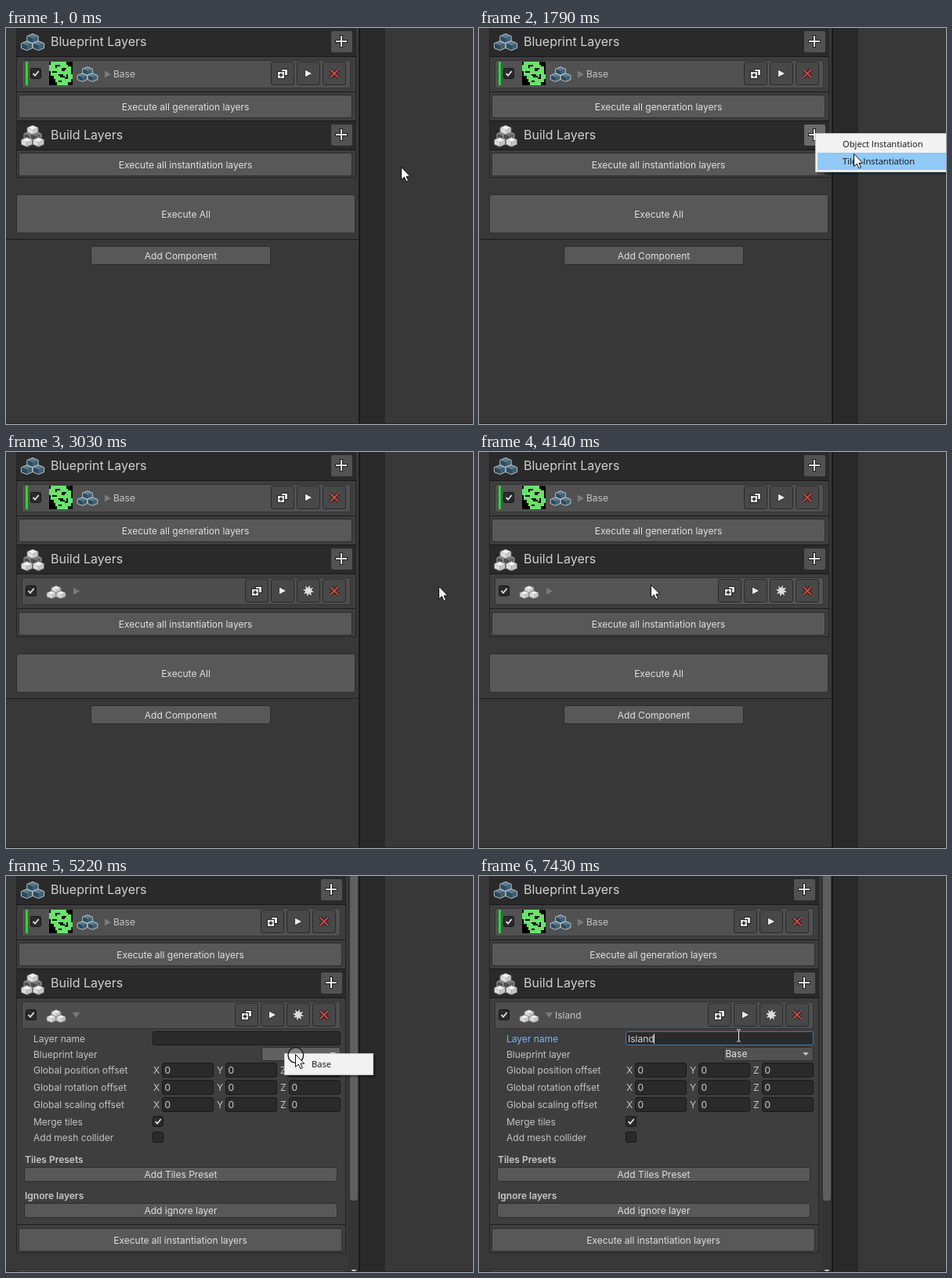
These frames come from a looping animation (596x505 px, 8 s). An HTML page:

```html
<!DOCTYPE html>
<html lang="en">
<head>
<meta charset="utf-8">
<title>Layer inspector</title>
<style>
html, body { margin: 0; width: 100%; height: 100%; overflow: hidden; background: #383838; }
svg { display: block; width: 596px; height: 505px; }
text { font-family: Inter, sans-serif; font-size: 12px; white-space: pre; }
.menu { font-family: "Open Sans", sans-serif; font-size: 11.2px; }
</style>
</head>
<body>
<svg id="stage" viewBox="0 0 596 505" xmlns="http://www.w3.org/2000/svg"></svg>
<script>
const LOOP = 8000;
const stage = document.getElementById('stage');

// Pointer track: time, x, y; each position holds until the next.
const track = [
  [0, 504, 177], [150, 518, 171], [300, 496, 160], [450, 462, 147], [580, 438, 138], [730, 430, 135],
  [1530, 438, 141], [1660, 458, 150], [1790, 478, 160], [1930, 496, 168], [2060, 511, 170],
  [2180, 531, 171], [2330, 552, 171],
  [3710, 515, 172], [3860, 415, 175], [4000, 300, 173], [4140, 219, 169], [4290, 196, 173],
  [4560, 208, 181], [4690, 250, 197], [4820, 305, 215], [4960, 350, 225], [5090, 369, 227],
  [5370, 376, 234], [5500, 388, 243], [5910, 362, 224], [6050, 331, 203]
];
const clicks = [[1130, 1250], [2760, 2900], [4290, 4560], [5220, 5370], [5770, 5910], [6180, 6320]];
const typing = [[7010, 'Is'], [7150, 'Isl'], [7290, 'Islan'], [7430, 'Island']];

const last = (list, t) => list.filter(k => k[0] <= t).pop();
const within = (t, a, b) => t >= a && t < b;

function rect(x, y, w, h, fill, line, r = 0) {
  return line
    ? `<rect x="${x + .5}" y="${y + .5}" width="${w - 1}" height="${h - 1}" rx="${r}" fill="${fill}" stroke="${line}"/>`
    : `<rect x="${x}" y="${y}" width="${w}" height="${h}" rx="${r}" fill="${fill}"/>`;
}
const text = (x, y, s, fill = '#c4c4c4', more = '') => `<text x="${x}" y="${y}" fill="${fill}" ${more}>${s}</text>`;
const path = (d, fill, line = 'none', w = 1, more = '') =>
  `<path d="${d}" fill="${fill}" stroke="${line}" stroke-width="${w}" ${more}/>`;
const at = (x, y, s) => `<g transform="translate(${x} ${y})">${s}</g>`;

const button = (x, y, w, h, label) =>
  rect(x, y, w, h, '#585858', '#2c2c2c', 2.5) +
  text(x + w / 2, y + h / 2 + 4.5, label, '#e0e0e0', 'text-anchor="middle"');

// Flat isometric block: top face, two sides and an outline.
function cube(x, y, w, h, top, left, right, line) {
  const q = h / 2;
  return at(x, y,
    path(`M0 ${-h}L${w} ${-q}L0 0L${-w} ${-q}Z`, top) +
    path(`M${-w} ${-q}L0 0V${h}L${-w} ${q}Z`, left) +
    path(`M${w} ${-q}L0 0V${h}L${w} ${q}Z`, right) +
    path(`M0 ${-h}L${w} ${-q}V${q}L0 ${h}L${-w} ${q}V${-q}Z`, 'none', line, .9, 'stroke-linejoin="round"'));
}
const blue = (x, y, w, h) => cube(x, y, w, h, '#587b91', '#2f495b', '#41606f', '#c3d2dc');
const white = (x, y, w, h) => cube(x, y, w, h, '#f2f2f2', '#dcdcdc', '#c6c6c6', '#777');
const gray = (x, y, w, h) => cube(x, y, w, h, '#7c7c7c', '#4c4c4c', '#636363', '#b4b4b4');

const blueprintIcon = k => [[0, -4.6], [-7.4, 4.6], [7.4, 4.6]].map(p => blue(p[0] * k, p[1] * k, 7.2 * k, 6 * k)).join('');
const buildIcon = () => gray(-4, 1, 7, 6) + gray(4, 1, 7, 6) +
  white(0, -7, 7, 6) + white(-7.5, 8.5, 7, 6) + white(7.5, 8.5, 7, 6);
const tileIcon = () => white(0, -3.5, 6, 5) + white(-6, 3, 6, 5) + white(6, 3, 6, 5);

const duplicate = () => rect(-2, -6, 9, 9, '#e6e6e6', '#222') + rect(-7, -3, 10, 10, '#e6e6e6', '#222') +
  path('M-2 -.5V4.5M-4.5 2H.5', 'none', '#222', 1.5);
const play = () => path('M-4.5 -5L5 0L-4.5 5Z', '#ececec', '#222', .8);
const cross = () => path('M-5 -5L5 5M5 -5L-5 5', 'none', '#1f1f1f', 4.4) +
  path('M-5 -5L5 5M5 -5L-5 5', 'none', '#c84848', 2.2);
function burst() {
  let d = '';
  for (let i = 0; i < 16; i++) {
    const a = i * Math.PI / 8 + .2, r = i % 2 ? 4.4 : 8.6;
    d += (i ? 'L' : 'M') + (r * Math.sin(a)).toFixed(1) + ' ' + (-r * Math.cos(a)).toFixed(1);
  }
  return path(d + 'Z', '#dcdcdc', '#222', .7);
}
const plus = (x, y, hot) => rect(x - 14, y - 14, 29, 29, hot ? '#6a6a6a' : '#525252', '#2a2a2a', 2.5) +
  path(`M${x} ${y - 8}V${y + 8}M${x - 8} ${y}H${x + 8}`, 'none', '#1c1c1c', 4) +
  path(`M${x} ${y - 7}V${y + 7}M${x - 7} ${y}H${x + 7}`, 'none', '#f0f0f0', 2);

const check = (x, y, on) => rect(x, y, 14, 14, '#2a2a2a', '#171717', 2) +
  (on ? path(`M${x + 3.5} ${y + 7}L${x + 6} ${y + 9.7}L${x + 10.7} ${y + 4}`, 'none', '#e4e4e4', 1.8) : '');
const fold = (x, y, open) => path(open ? `M${x - 5} ${y - 3.5}h9l-4.5 7z` : `M${x - 4} ${y - 4.5}v9l8 -4.5z`, '#7a7a7a');

function thumb(x, y) {
  const green = 'M1 0h10v2h1v1h2v5h1v3h-1v2h-2v2h-7v-2h-1v-2h-1v-2h-2v-3h-1v-4h1z';
  const holes = 'M4 2h3v1h-2v1h-1zM8 4h3v1h-1v1h-2zM2 6h3v1h-3zM6 8h3v1h1v1h-3v-1h-1zM11 8h1v3h-2v-1h1zM6 12h2v1h-2z';
  return rect(x, y, 30, 30, '#000') + `<g transform="translate(${x} ${y}) scale(2)" shape-rendering="crispEdges">` +
    path(green, '#69e36b') + path(holes, '#000') + '</g>';
}
const rowTools = (right, y, icons) => icons.map((icon, i) => {
  const x = right - 21 - 33 * (icons.length - 1 - i);
  return rect(x - 15, y - 15, 30, 30, '#484848', '#2a2a2a', 2.5) + at(x, y, icon());
}).join('');

const header = (y, w, label, icon, hot) =>
  rect(14, y, w, 36, '#2a2a2a') + rect(13, y + 36, w + 1, 1, '#191919') +
  at(34, y + 18, icon) + text(57, y + 22.5, label, '#d0d0d0', 'style="font-size:16px"') + plus(w - 5, y + 17, hot);

function details(s) {
  const names = [['Layer name', 212], ['Blueprint layer', 232], ['Global position offset', 252],
    ['Global rotation offset', 274], ['Global scaling offset', 296], ['Merge tiles', 318], ['Add mesh collider', 338]];
  let out = names.map((n, i) => text(35, n[1], n[0], !i && s.focus ? '#7fb0fb' : '#c4c4c4')).join('');
  out += rect(187, 198, 240, 18, '#2a2a2a', s.focus ? '#3a79bb' : s.beam ? '#656565' : '#191919', 2.5);
  out += text(190, 212, s.name, '#d2d2d2', 'id="field"');
  const x = s.chosen ? 312 : 326;
  out += rect(x, 218, 427 - x, 18, s.popup ? '#606060' : '#515151', '#2c2c2c', 2.5) +
    (s.chosen ? text(314.5, 231, 'Base', '#e0e0e0') : '') + path('M413 225h8l-4 4z', '#c4c4c4');
  for (const y of [238, 260, 282]) ['X', 'Y', 'Z'].forEach((axis, i) => {
    const fx = 199 + 81 * i;
    out += text(fx - 11, y + 14, axis) + rect(fx, y, 66, 19, '#2a2a2a', '#191919', 2.5) + text(fx + 3.5, y + 14, '0', '#d2d2d2');
  });
  out += check(187, 306, true) + check(187, 326, false);
  const bold = 'font-weight="600"';
  return out + text(24, 366, 'Tiles Presets', '#c8c8c8', bold) + button(23, 371, 400, 19, 'Add Tiles Preset') +
    text(24, 412, 'Ignore layers', '#c8c8c8', bold) + button(23, 417, 400, 19, 'Add ignore layer');
}

function panel(s) {
  const edge = s.open ? 434 : 447, w = edge - 14, row = s.open ? 427 : 440;
  const run = s.open ? 449 : s.added ? 204 : 159;
  let out = rect(13, -2, w + 1, run + 34, '#3e3e3e', '#232323');
  out += header(0, w, 'Blueprint Layers', blueprintIcon(1), false);
  out += rect(20, 41, row - 20, 36, '#515151', '#323232', 2.5) + rect(25, 43, 3, 30, '#27d92f') +
    check(31, 51, true) + thumb(55, 43) + at(104, 59, blueprintIcon(.88)) + fold(130, 59) +
    text(137, 63, 'Base') + rowTools(row, 58, [duplicate, play, cross]);
  out += rect(14, 81, w - 1, 1, '#1b1b1b') + button(16, 85, w - 7, 30, 'Execute all generation layers');
  out += rect(13, 118, w + 1, 1, '#191919') + header(119, w, 'Build Layers', buildIcon(), s.plusHot);
  if (s.added) {
    out += rect(20, 160, row - 20, 35, s.rowHot ? '#545454' : '#4e4e4e', '#323232', 2.5) + check(25, 170, true) +
      at(64, 179, tileIcon()) + fold(90, 177.5, s.open) + text(97, 182, s.name) +
      rowTools(row, 177, [duplicate, play, burst, cross]) + rect(14, run - 5, w - 1, 1, '#1b1b1b');
  }
  if (s.open) out += details(s);
  out += button(16, run, w - 7, 30, 'Execute all instantiation layers');
  out += button(13, run + 53, w, 50, s.open ? '' : 'Execute All');
  if (!s.open) out += rect(0, run + 110, 451, 1, '#1c1c1c') + button(108, run + 119, 230, 24, 'Add Component');
  return out;
}

function frame() {
  return rect(0, 0, 596, 505, '#383838') + rect(452, 0, 32, 505, '#292929') + rect(450, 0, 2, 505, '#191919');
}
const scrollbar = () => rect(437, 0, 13, 505, '#343434') + rect(439, -8, 10, 422, '#5f5f5f', '', 4) +
  path('M440.5 502h7l-3.5 4z', '#c8c8c8');

const shadow = (x, y, w, h) => rect(x + 3, y + 3, w, h, 'rgba(0,0,0,.25)');
function addMenu(s) {
  return `<g opacity="${s.menu}">` + shadow(429, 134, 170, 50) + rect(429, 134, 170, 50, '#f2f2f2', '#c4c4c4') +
    (s.hover ? rect(432, s.hover < 2 ? 137 : 159, 164, 22, '#91c9f7') : '') +
    text(464, 152, 'Object Instantiation', '#111', 'class="menu"') +
    text(464, 174, 'Tiles Instantiation', '#111', 'class="menu"') + '</g>';
}
const basePopup = s => shadow(355, 226, 114, 28) + rect(355, 226, 114, 28, '#f2f2f2', '#c4c4c4') +
  (s.y > 236 ? rect(358, 229, 108, 22, '#91c9f7') : '') + text(390, 244, 'Base', '#111', 'class="menu"');

function pointer(s) {
  const ring = s.ring ? `<circle cx="${s.x + .8}" cy="${s.y + 1.5}" r="9.8" fill="#fff" fill-opacity=".22" stroke="#111" stroke-width="1.3"/>` : '';
  const shape = s.beam
    ? path('M-2.5 -7.5H-.8L0 -7L.8 -7.5H2.5M0 -7V7M-2.5 7.5H-.8L0 7L.8 7.5H2.5', 'none', '#f0f0f0', 1)
    : path('M0 0V16L3.8 12.6L6.4 18.3L8.9 17.2L6.4 11.7H11.2Z', '#fff', '#111', 1);
  return ring + at(s.x + .5, s.y + .5, shape);
}

function stateAt(t) {
  const [, x, y] = last(track, t);
  const typed = last(typing, t);
  const added = t >= 3030;
  return {
    x, y, added,
    ring: clicks.some(c => within(t, c[0], c[1])),
    plusHot: within(t, 580, 2900),
    menu: within(t, 1250, 1380) ? .45 : within(t, 1380, 2900) ? 1 : 0,
    hover: y >= 159 && x < 560 ? 2 : y > 140 ? 1 : 0,
    rowHot: added && x < 430 && y > 160 && y < 194,
    open: t >= 4290,
    popup: within(t, 5220, 5910),
    chosen: t >= 5910,
    beam: t >= 6050,
    focus: t >= 6180,
    name: typed ? typed[1] : ''
  };
}

let shown = '';
function draw(t) {
  const s = stateAt(t), key = JSON.stringify(s);
  if (key === shown) return;
  shown = key;
  stage.innerHTML = frame() + panel(s) + (s.open ? scrollbar() : '') + rect(0, 504, 596, 1, '#242424') +
    (s.menu ? addMenu(s) : '') + (s.popup ? basePopup(s) : '') + '<g id="caret"></g>' + pointer(s);
  if (s.focus) {
    const end = 190 + document.getElementById('field').getComputedTextLength();
    document.getElementById('caret').innerHTML = rect(Math.floor(end), 201, 1, 13, '#e0e0e0');
  }
}

const start = performance.now();
function tick() {
  draw((performance.now() - start) % LOOP);
  requestAnimationFrame(tick);
}
tick();
</script>
</body>
</html>
```
